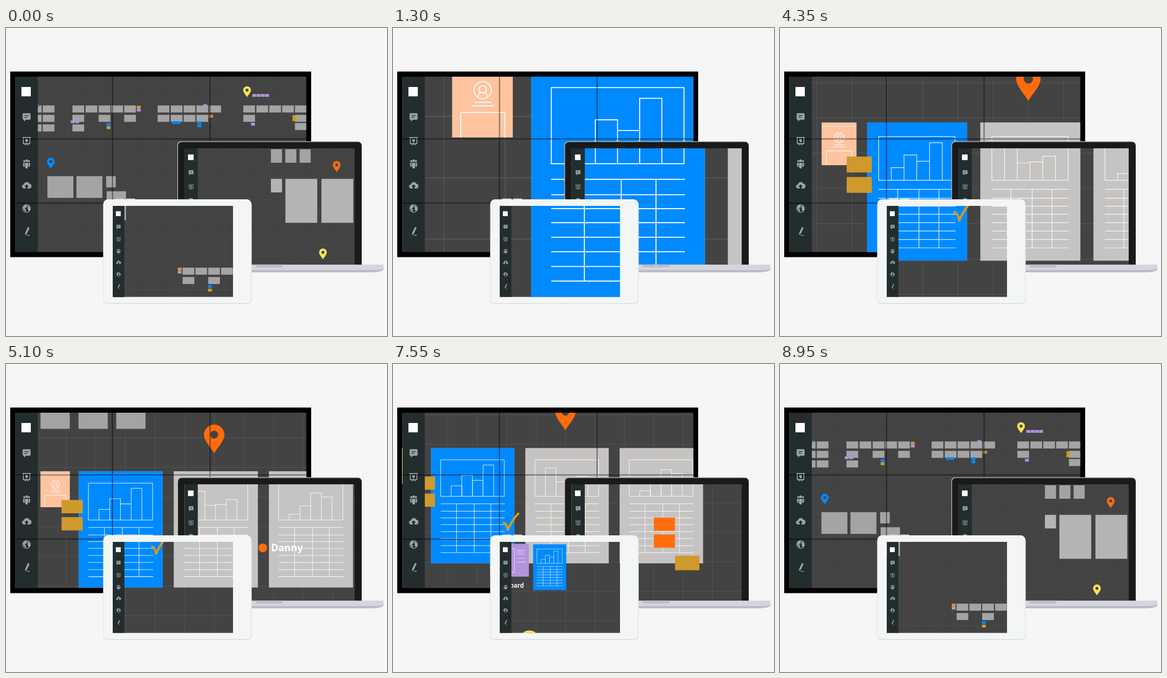
Write an HTML page that moves like this. It is 814 px wide and 658 px high and loops after 9.5 s.

```html
<!DOCTYPE html>
<html lang="en">
<head>
<meta charset="utf-8">
<title>Shared workspace on three screens</title>
<style>
  html, body { margin: 0; width: 100%; height: 100%; overflow: hidden; background: #f6f6f6; }
  svg { display: block; width: 814px; height: 658px; }
  text { font-family: "Noto Sans CJK JP", "Noto Sans CJK SC", "Noto Sans", sans-serif; font-weight: 700; fill: #fff; }
</style>
</head>
<body>
<svg viewBox="0 0 814 658" xmlns="http://www.w3.org/2000/svg">
  <defs>
    <clipPath id="tvClip"><rect x="19.5" y="104" width="622" height="374.5"/></clipPath>
    <clipPath id="laptopClip"><rect x="381" y="257" width="364" height="249"/></clipPath>
    <clipPath id="tabletClip"><rect x="228" y="380" width="257" height="194.5"/></clipPath>

    <g id="sidebar">
      <rect x=".5" width="47.5" height="420" fill="#232d2e"/>
      <rect x="13" y="22" width="20" height="20" fill="#fff"/>
      <g fill="#9aa5a7" stroke="#9aa5a7" stroke-width="0">
        <path d="M17.500 78h13q2 0 2 2v10q0 2-2 2h-8l-4 4v-4h-1q-2 0-2-2v-10q0-2 2-2z"/>
        <path d="M19.500 83h9m-9 4h6" stroke="#232d2e" stroke-width="1.500"/>
        <path d="M15 130h18M17 130v13h14v-13M20 146l4-3 4 3" fill="none" stroke-width="1.800"/>
        <path d="M24 141q-3-4-3-5.500a3 3 0 0 1 6 0q0 1.500-3 5.500z"/>
        <circle cx="24" cy="179.500" r="2.800"/><circle cx="19" cy="180.500" r="2.200"/><circle cx="29" cy="180.500" r="2.200"/>
        <path d="M20.500 184h7v7l-1.500 5h-4l-1.500-5zM17 184h2.500v9h-1.500l-2-5zM31 184h-2.500v9h1.500l2-5z"/>
        <path d="M19 239a4.500 4.500 0 0 1-.5-9 5.800 5.800 0 0 1 11-1.500 5.300 5.300 0 0 1 .5 10.500h-4v-4h3l-5-5-5 5h3v4z"/>
        <circle cx="24" cy="281.500" r="8.200" fill="none" stroke-width="1.500"/>
        <path d="M17 277l4-3 4 1-1 4-4 2 3 3-1 5-3-4-3-5zM27 275l4 4 1 4-3 5-3-5 1-3-2-2z"/>
        <path d="M27 321l3.500 1.500-6 13-4 3 .5-5zM24 338h7v1.500h-7z"/>
      </g>
    </g>

    <g id="world">
      <rect x="-1700" y="-600" width="2900" height="1800" fill="#434343"/>
      <path id="grid" stroke="#575757" stroke-width=".9" fill="none"/>
      <g id="map" transform="scale(2.618) translate(-538.1 -234.2)"></g>
      <g id="greys"></g>
      <g id="detail"></g>
      <g id="pins"></g>
    </g>
  </defs>

  <rect width="814" height="658" fill="#f6f6f6"/>

  <rect x="9" y="93" width="643" height="396.500" fill="#000"/>
  <g clip-path="url(#tvClip)">
    <use href="#world"/>
    <use href="#sidebar" transform="translate(20 104)"/>
    <path d="M227.500 104v375M436 104v375M20 237h622M20 374h622" stroke="#000" stroke-opacity=".42" stroke-width="2.600"/>
  </g>

  <path d="M366 508V251q0-9 9-9H751q9 0 9 9V508z" fill="#b9b9bb"/>
  <path d="M367.500 508V252q0-8.500 8.500-8.500H751q9 0 9 9V508z" fill="#1a1a1a"/>
  <g clip-path="url(#laptopClip)">
    <use href="#world"/>
    <use href="#sidebar" transform="translate(381 257) scale(.6)"/>
  </g>
  <path d="M320 512H806.500V516q-6 6-28 6H320z" fill="#bbbbc8"/>
  <path d="M320 505.500H806.500V514q-4 3-20 3H320z" fill="#d6d6da"/>
  <path d="M533 505.500h58v3q0 3-4 3h-50q-4 0-4-3z" fill="#bdbec7"/>

  <rect x="233" y="364.300" width="20" height="4" rx="1" fill="#c9cccc"/>
  <rect x="257" y="364.300" width="19" height="4" rx="1" fill="#c9cccc"/>
  <rect x="207.500" y="367" width="317.500" height="223" rx="10" fill="#dfe3e2"/>
  <rect x="208.500" y="366" width="315" height="221.500" rx="9" fill="#f4f6f6"/>
  <g clip-path="url(#tabletClip)">
    <use href="#world"/>
    <use href="#sidebar" transform="translate(228 380) scale(.52)"/>
  </g>

  <rect id="flyingNote" width="52" height="31" fill="#cf9a2c"/>
</svg>

<script>
const LOOP = 9500, STEP = 50;
const BLUE = '#008aff', GOLD = '#cf9a2c', PURPLE = '#b094dc', YELLOW = '#fde453', ORANGE = '#ff6c0c';
const $ = id => document.getElementById(id);
const rect = (x, y, w, h, fill, extra = '') =>
  `<rect x="${x}" y="${y}" width="${w}" height="${h}" fill="${fill}" ${extra}/>`;
const strokes = (d, width = 1) => `<path d="${d}" fill="none" stroke="#fff" stroke-width="${width}"/>`;

// Background grid
const CELL = 62.8;
let gridPath = '';
for (let k = -27; k < 18; k++) gridPath += `M${1.7 + k * CELL} -600V1200`;
for (let k = -13; k < 17; k++) gridPath += `M-1700 ${159.5 + k * CELL}H1200`;
$('grid').setAttribute('d', gridPath);

// Overview cards and tags
const card = (y, xs) => xs.map(x => rect(x, y, 25, 15, '#a4a4a4')).join('');
const tags = (fill, points) => points.map(([x, y]) => rect(x, y, 8.3, 6, fill)).join('');
$('map').innerHTML =
  card(165.5, [51, 78.5, 142, 170, 198, 225, 252.5, 324, 352, 379.5, 407, 434.5, 507, 535, 562.5, 590, 617.3]) +
  card(185.5, [51, 78.5, 142, 198, 252.5, 324, 352, 379.5, 407, 507, 617.3]) +
  card(206, [51, 78.5, 142]) + card(203, [617.3]) +
  card(512, [377.3, 404.7, 432, 459.5]) + card(532, [377.3, 432]) +
  rect(88.5, 316.5, 55.5, 46.5, '#a4a4a4') + rect(150.5, 316.5, 55.5, 46.5, '#a4a4a4') +
  rect(214, 316.5, 20.5, 24, '#a4a4a4') + rect(215, 348.7, 41.5, 62, '#a4a4a4') +
  tags(GOLD, [[279.5, 166], [434, 185.5], [215, 210], [612, 186.5], [612, 193], [367, 512], [431.5, 557]]) +
  tags(PURPLE, [[279.5, 172.3], [138.5, 197.3], [148, 197.3], [421.5, 163], [523.5, 202.5],
    [526.3, 141], [535.5, 141], [544.5, 141], [553.5, 141], [367, 518.5]]) +
  tags(BLUE, [[62, 163], [215, 203.5], [355, 199], [364, 199], [409, 199.3], [409, 206], [431.5, 549.5]]);

$('greys').innerHTML =
  [73, 153.5, 233.5].map(x => rect(x, 65, 62, 75.5, '#a3a3a3')).join('') +
  rect(73, 230.5, 62, 76, '#b4b4b4') +
  [154, 355.5, 557].map(x => rect(x, 230.5, 178, 246, '#b4b4b4')).join('');

// Report sheet: bar chart over a table
function sheet(x, y, fill, bars, width = 1) {
  let d = 'M20.5 25h136v78h-136z';
  bars.forEach((h, i) => d += `M${43 + i * 22.7} 103v${-h}h22.7v${h}`);
  for (const row of [119, 134.8, 149, 163.4, 178.3, 193.2, 208.3, 223.2]) d += `M20.5 ${row}h137`;
  for (const col of [54.4, 92.2, 127.8]) d += `M${col} 119V223.2`;
  return `<g transform="translate(${x} ${y})">${rect(0, 0, 178, 246, fill)}${strokes(d, width)}</g>`;
}
const label = (id, name, color, x, y, r, size) =>
  `<g id="${id}"><circle cx="${x}" cy="${y}" r="${r}" fill="${color}"/>` +
  `<text x="${x + r * 1.9}" y="${y + size * .35}" font-size="${size}">${name}</text></g>`;
const note = (id, x, y, w, h, fill) => rect(x, y, w, h, fill, `id="${id}"`);
const mainBars = [22.5, 45, 34, 67];

$('detail').innerHTML =
  rect(73, 230.5, 62, 76, '#ffc49f') +
  strokes('M73 237.300h62M95.600 270.600h17.200M92.700 274.100h23M81.700 306.500V281h45v25.500' +
    'M113 258.100a8.800 8.800 0 1 1-17.600 0a8.800 8.800 0 1 1 17.600 0' +
    'M108 257.300a3.800 3.800 0 1 1-7.600 0a3.800 3.800 0 1 1 7.600 0M99.500 265.300q.5-4.300 3-4.600M109 265.300q-.5-4.300-3-4.600') +
  sheet(154, 230.5, BLUE, mainBars) +
  sheet(355.5, 230.5, '#c6c4c2', [61, 31, 33, 43]) +
  sheet(557, 230.5, '#c6c4c2', [12, 30, 57, 48.5]) +
  note('note1', 117.6, 291.2, 44.9, 28.2, GOLD) +
  note('note2', 117.6, 327.5, 44.9, 28.2, GOLD) +
  `<path id="check" d="M309.800 390Q316 393 318 405Q327 384 340.300 370.500" pathLength="1" stroke-dasharray="1 2"
    fill="none" stroke="${GOLD}" stroke-linecap="round" stroke-linejoin="round"/>` +
  label('label1', 'Corina', '#53bcbc', 72.9, 341.3, 4.7, 11.5) +
  note('note3', 630, 379, 45, 28.3, ORANGE) +
  note('note4', 630, 415, 45, 28.3, ORANGE) +
  note('note5', 675.3, 460.3, 52, 31, GOLD) +
  label('label2', 'Danny', ORANGE, 544, 392.7, 9.2, 21.5) +
  `<g id="copy">${sheet(0, 0, BLUE, mainBars, 1.7)}</g>` +
  label('label3', 'Rupert', YELLOW, 369.3, 421, 8.2, 20.5) +
  `<g id="board">${rect(0, 0, 83, 70, PURPLE)}` +
  strokes('M8 10h44v51h-44zM57 14h19M57 17.500h14M57 22h18M57 39h19', .8) +
  `<path d="M57 31h19" stroke="#fff" stroke-width=".9" stroke-dasharray="1.500 1"/>` +
  `<text x="0" y="94" font-size="13">Storyboard</text></g>`;

const pin = (x, y, fill) => `<g transform="translate(${x} ${y})">
  <path d="M0 0C-5-10-21.700-26-21.700-39.300A21.700 21.700 0 0 1 21.700-39.300C21.700-26 5-10 0 0z" fill="${fill}"/>
  <circle cy="-39.500" r="8.300" fill="#434343"/></g>`;
$('pins').innerHTML = pin(441, 192.3, ORANGE) + pin(364, 681, YELLOW) +
  pin(-60.5, -226, YELLOW) + pin(-1158, 173, BLUE);

// Motion
const clamp = v => Math.min(1, Math.max(0, v));
const mix = (a, b, p) => a + (b - a) * p;
const ramp = (t, start, length) => clamp((t - start) / length);
const expoOut = u => (1 - 2 ** (-10 * u)) / (1 - 2 ** -10);
const cubicOut = u => 1 - (1 - u) ** 3;

const OVERVIEW = { s: .382, x: 538.1, y: 234.2 };
const CLOSE = { s: 2.092, x: -28, y: -408 };
const moves = [
  { at: 0, length: 1700, to: CLOSE },
  { at: 3935, length: 1700, to: { s: 1, x: 0, y: 0 }, bend: 43 },
  { at: 6870, length: 900, to: { s: 1, x: -73, y: -51 } },
  { at: 7600, length: 1350, to: OVERVIEW },
];

function camera(t) {
  let view = OVERVIEW;
  for (const { at, length, to, bend = 0 } of moves) {
    if (t < at) break;
    const p = expoOut(ramp(t, at, length));
    view = {
      s: mix(view.s, to.s, p),
      x: mix(view.x, to.x, p) + bend * p * (1 - p),
      y: mix(view.y, to.y, p),
    };
  }
  return view;
}

const fade = (id, value) => $(id).setAttribute('opacity', value);
const place = (id, x, y, s = 1) => $(id).setAttribute('transform', `translate(${x} ${y}) scale(${s})`);
const inOut = (t, start, end, length = 200) => ramp(t, start, length) * (1 - ramp(t, end, length));

function render(t) {
  const view = camera(t);
  place('world', view.x, view.y, view.s);
  fade('detail', clamp((view.s - .4) / .35));

  fade('note1', ramp(t, 2100, 150));
  fade('note2', ramp(t, 2650, 100));
  fade('label1', inOut(t, 2870, 3750));
  const drawn = cubicOut(ramp(t, 3050, 400));
  $('check').setAttribute('stroke-dashoffset', 1 - drawn);
  $('check').setAttribute('stroke-width', 4.8 / Math.max(1, view.s)); // constant pen width on screen
  fade('check', drawn > 0 ? 1 : 0);

  fade('label2', inOut(t, 4900, 6100));
  fade('note3', ramp(t, 5100, 150));
  fade('note4', ramp(t, 5350, 150));
  const flying = t >= 5500 && t < 5800;
  const flight = cubicOut(ramp(t, 5500, 300));
  place('flyingNote', mix(749, 675.3, flight), mix(82, 460.3, flight));
  fade('flyingNote', flying ? 1 : 0);
  fade('note5', t >= 5800 ? 1 : 0);

  place('copy', 372, mix(575, 436, cubicOut(ramp(t, 5880, 280))), .398);
  fade('copy', t > 5880 ? 1 : 0);
  fade('label3', inOut(t, 6100, 6650));
  const slide = cubicOut(ramp(t, 6350, 350));
  place('board', mix(144, 280, slide), mix(354, 435, slide));
  fade('board', ramp(t, 6350, 100));
}

// The picture advances in even steps
const start = performance.now();
function tick() {
  const t = (performance.now() - start) % LOOP;
  render(Math.floor(t / STEP) * STEP);
  requestAnimationFrame(tick);
}
tick();
</script>
</body>
</html>
```
